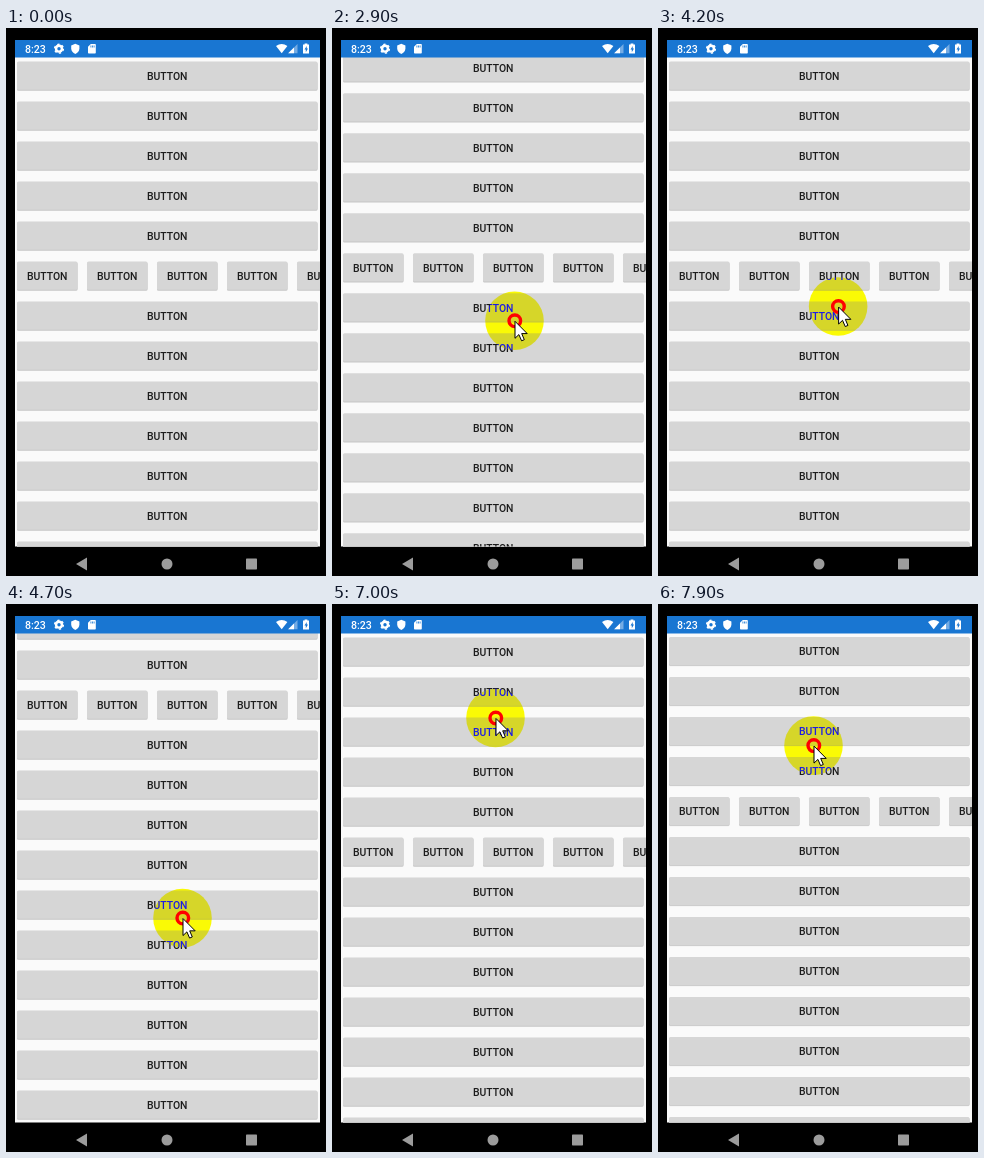
Animation of 320 by 548 pixels, one loop 8000 ms. Source, as an HTML page:

```html
<!DOCTYPE html>
<html lang="en">
<head>
<meta charset="utf-8">
<title>Button list</title>
<style>
  html, body { margin: 0; width: 100%; height: 100%; overflow: hidden; background: #000; }
  svg { display: block; width: 100vw; height: 100vh; }
  text { font-family: Roboto, sans-serif; font-weight: 500; }
  .label { font-size: 10.4px; fill: #1c1c1c; text-anchor: middle; }
  .spot { mix-blend-mode: difference; fill: #00f; }
</style>
</head>
<body>
<svg viewBox="0 0 320 548">
  <defs>
    <clipPath id="screen"><rect x="9" y="29" width="305" height="489.6"/></clipPath>
  </defs>
  <rect width="320" height="548"/>
  <g clip-path="url(#screen)">
    <rect x="9" y="29" width="305" height="490" fill="#fafafa"/>
    <g id="list"></g>
  </g>

  <rect x="9" y="12" width="305" height="17.5" fill="#1976d2"/>
  <g fill="#fff">
    <text x="19" y="25" font-size="10.6">8:23</text>
    <circle cx="53" cy="20.7" r="2.9" fill="none" stroke="#fff" stroke-width="2.4"/>
    <circle cx="53" cy="20.7" r="4.4" fill="none" stroke="#fff" stroke-width="1.4" stroke-dasharray="2.3 2.308"/>
    <path d="M69.3 15.8l4.1 1.8v3c0 2.6-1.7 4.500-4.100 5.300c-2.400-.8-4.100-2.700-4.100-5.300v-3z"/>
    <path d="M84.800 16h4.200q.8 0 .8.800v8q0 .8-.8.8h-6.200q-.8 0-.8-.8v-6z"/>
    <path d="M84.900 17.500v2M86.500 17.500v2M88.100 17.500v2" stroke="#1976d2" stroke-width=".8"/>
    <path d="M270 18.100q5.700-4.400 11.400 0l-5.700 7.200z"/>
    <path d="M291.500 16v9.300h-9.300z" opacity=".4"/>
    <path d="M288 19.500v5.800h-5.800z"/>
    <path d="M298.600 15.500h2.800v1.100h1.600v8.900h-6v-8.900h1.600z"/>
    <path d="M300.700 18l-2.200 3.600h1.300v2.600l2.200-3.700h-1.300z" fill="#1976d2"/>
  </g>

  <g fill="#9c9c9c">
    <path d="M70 536l11-6.500v13z"/>
    <circle cx="161" cy="536" r="5.5"/>
    <rect x="240" y="530.5" width="11" height="11" rx=".7"/>
  </g>

  <circle class="spot" id="spot" r="29.3"/>
  <g id="pointer">
    <circle id="ring" cx=".3" r="5.800" fill="none" stroke="#f00" stroke-width="3.400"/>
    <path d="M.5.5v17l3.900-3.700 2.700 6.200 2.700-1.100-2.600-6.100h5.500z" fill="#fff" stroke="#000" stroke-linejoin="round"/>
  </g>
</svg>
<script>
const LOOP = 8000, STEP = 100, PITCH = 40, ROWS = 20, CAROUSEL = 5;
const ENTER = 700, PRESS = 2400, LOW = 352, HIGH = 114, GRAB = 338, LAG = 100;
const $ = id => document.getElementById(id);

// Way in before the press: [time, x, y]
const approach = [
  [ENTER, 60, 142], [1200, 214, 292.5], [1500, 272, 355], [1800, 238, 375], [2000, 188, LOW]
];

// Sideways drift while dragging: [time, x]
const drift = [
  [PRESS, 188], [2900, 182.5], [3600, 184.5], [4700, 176.5], [7000, 163.5], [7900, 155.5]
];

// Drag strokes, alternately up and down: [start, end]
const strokes = [
  [2654, 3394], [3600, 3950], [4050, 4450], [4491, 4774], [4900, 5200],
  [5500, 5850], [6900, 7000], [7200, 7500], [7731, 7948]
];

const clamp = p => Math.min(1, Math.max(0, p));
const ease = p => (1 - Math.cos(Math.PI * clamp(p))) / 2;

function along(keys, t, n) {
  let value = keys[0][n];
  for (let i = 1; i < keys.length; i++) {
    const a = keys[i - 1], b = keys[i];
    value += (b[n] - a[n]) * clamp((t - a[0]) / (b[0] - a[0]));
  }
  return value;
}

function dragY(t) {
  return strokes.reduce((y, [start, end], i) =>
    y + (i % 2 ? 1 : -1) * (LOW - HIGH) * ease((t - start) / (end - start)), LOW);
}

const pointerAt = t => t < PRESS
  ? [along(approach, t, 1), along(approach, t, 2)]
  : [along(drift, t, 1), dragY(t)];

// The list follows the drag with a short delay and stops at its top.
const scrollAt = t => Math.max(0, GRAB - dragY(t - LAG));

function button(x, y, w) {
  const box = (dy, fill) =>
    `<rect x="${x}" y="${y + dy}" width="${w}" height="28.2" rx="1.5" fill="${fill}"/>`;
  return box(1.2, '#e2e2e2') + box(.7, '#c6c6c6') + box(0, '#d6d6d6') +
    `<text class="label" x="${x + w / 2}" y="${y + 18.3}">BUTTON</text>`;
}

function buildList() {
  let out = '';
  for (let i = 0; i < ROWS; i++) {
    const y = 33.5 + i * PITCH;
    if (i !== CAROUSEL) out += button(11, y, 300.5);
    else for (let n = 0; n < 5; n++) out += button(11 + n * 70, y, 60.5);
  }
  $('list').innerHTML = out;
}

function render(t) {
  const [x, y] = pointerAt(t);
  for (const id of ['spot', 'pointer']) {
    $(id).setAttribute('transform', `translate(${x} ${y})`);
    $(id).setAttribute('visibility', t < ENTER ? 'hidden' : 'visible');
  }
  $('ring').setAttribute('opacity', t < PRESS ? 0 : 1);
  $('list').setAttribute('transform', `translate(0 ${-scrollAt(t)})`);
}

function tick() {
  const t = performance.now() % LOOP;
  render(Math.floor(t / STEP) * STEP);
  requestAnimationFrame(tick);
}

buildList();
tick();
</script>
</body>
</html>
```
